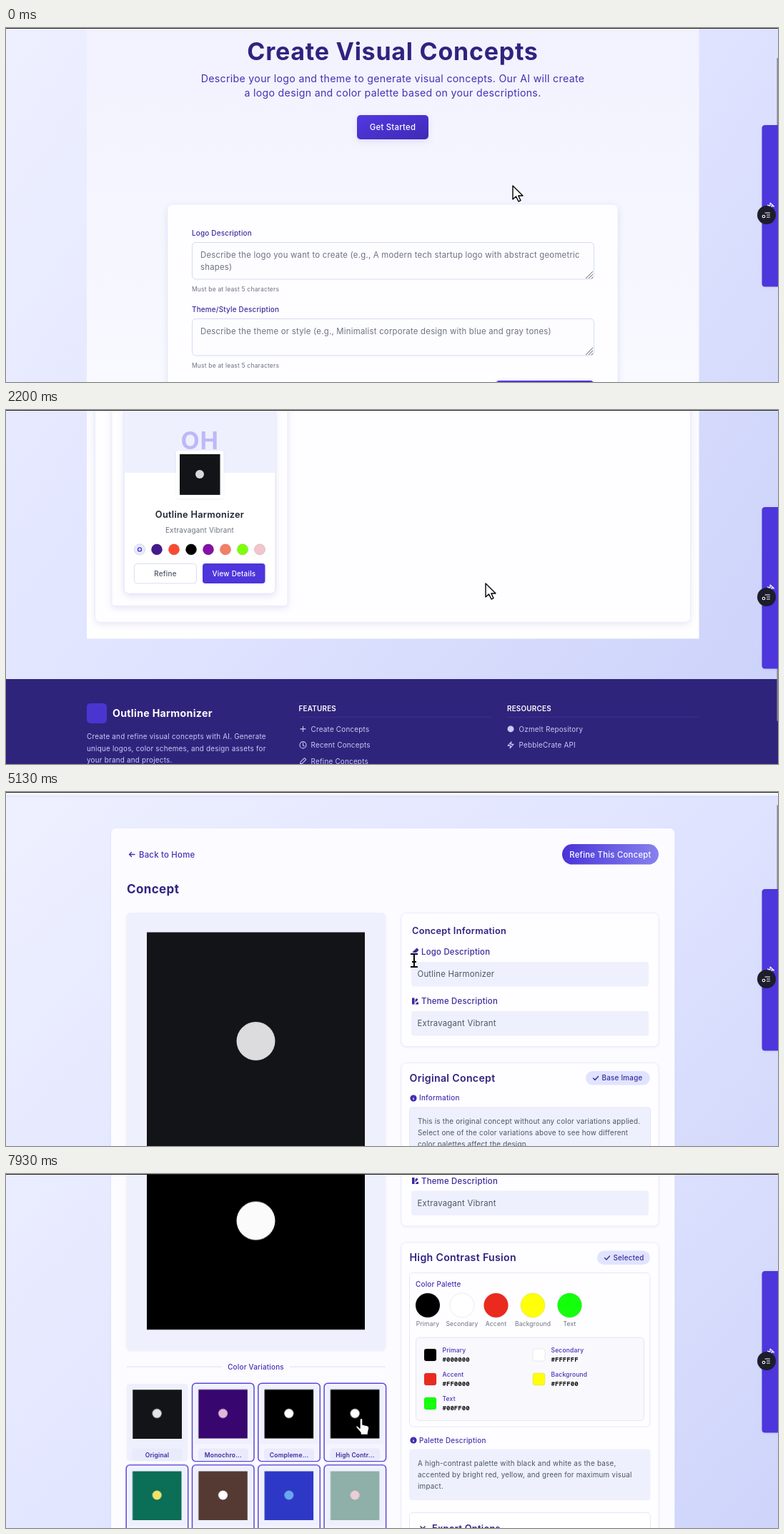
An HTML page that plays this animation: 1080x496 px, repeating every 8 s.

```html
<!DOCTYPE html>
<html lang="en">
<head>
<meta charset="utf-8">
<title>Concept generator walkthrough</title>
<style>
html, body { margin: 0; width: 100%; height: 100%; overflow: hidden; background: #e6e9ff; }
svg { display: block; width: 100%; height: 100%; }
text {
  font-family: Inter, "Open Sans", sans-serif; font-optical-sizing: none;
  letter-spacing: .022em; white-space: pre;
}
.xs { font-size: 8.5px; } .s { font-size: 9.9px; } .m { font-size: 11.33px; }
.l { font-size: 12.75px; } .x { font-size: 14.16px; } .h { font-size: 17px; } .d { font-size: 34px; }
.w5 { font-weight: 500; } .w6 { font-weight: 600; } .w7 { font-weight: 700; letter-spacing: .022em; }
.c { text-anchor: middle; }
.ink { fill: #2f2380; } .ind { fill: #4431b4; } .nav { fill: #3b2a9a; }
.gray { fill: #6b7280; } .slate { fill: #4b5563; } .white { fill: #fff; } .pale { fill: #c6cbf8; }
.code { font: 700 9.1px "Noto Sans Mono", "DejaVu Sans Mono", monospace; letter-spacing: 0; fill: #111; }
.card { fill: #fefdff; stroke: #ebedfd; }
.tint { fill: #eef0fd; }
.line { fill: var(--fill, none); stroke: currentColor; stroke-width: 1.1; stroke-linecap: round; stroke-linejoin: round; }
.sh { filter: drop-shadow(0 3px 4px #3b2fa01c); }
.soft { filter: drop-shadow(0 1px 1.5px #3b2fa014); }

/* scroll: --k is the share of the page offset that an element follows */
.page { --k: -1; }
.down { animation: down 8s linear infinite; }
.read { animation: read 8s linear infinite; }
@keyframes down {
  0%, 1% { transform: translateY(0); animation-timing-function: ease-in; }
  6% { transform: translateY(calc(var(--k) * 60px)); }
  16.625% { transform: translateY(calc(var(--k) * 368px)); }
  27.5% { transform: translateY(calc(var(--k) * 699px)); animation-timing-function: ease-out; }
  31%, 100% { transform: translateY(calc(var(--k) * 715px)); }
}
@keyframes read {
  0%, 60% { transform: translateY(0); animation-timing-function: ease-in; }
  65% { transform: translateY(calc(var(--k) * 56px)); }
  72% { transform: translateY(calc(var(--k) * 210px)); animation-timing-function: ease-out; }
  75.5%, 77.5% { transform: translateY(calc(var(--k) * 243.5px)); animation-timing-function: ease-in-out; }
  83.5%, 100% { transform: translateY(calc(var(--k) * 324.5px)); }
}

/* hard switches */
.sw { animation: 8s step-end infinite; }
#home { animation-name: leave; }
#detail { animation-name: enter; }
#bar2 { animation-name: barIn; }
.before { animation-name: pickOff; }
.after { animation-name: pickOn; }
#arrow { animation-name: arrow; }
#hand { animation-name: hand; }
#beam { animation-name: beam; }
@keyframes leave { 0% { opacity: 1; } 48.4%, 100% { opacity: 0; } }
@keyframes enter { 0% { opacity: 0; } 48.4%, 100% { opacity: 1; } }
@keyframes barIn { 0% { opacity: 0; } 60.5%, 100% { opacity: 1; } }
@keyframes pickOff { 0% { opacity: 1; } 93.4%, 100% { opacity: 0; } }
@keyframes pickOn { 0% { opacity: 0; } 93.4%, 100% { opacity: 1; } }
@keyframes arrow { 0% { opacity: 1; } 40.2% { opacity: 0; } 48.4% { opacity: 1; } 52.5% { opacity: 0; } 66% { opacity: 1; } 74%, 100% { opacity: 0; } }
@keyframes hand { 0% { opacity: 0; } 40.2% { opacity: 1; } 48.4% { opacity: 0; } 74%, 100% { opacity: 1; } }
@keyframes beam { 0% { opacity: 0; } 52.5% { opacity: 1; } 66%, 100% { opacity: 0; } }

/* soft changes */
.lift { animation: lift 8s ease-out infinite; }
#view { animation: press 8s linear infinite; }
#spin { animation: gone 8s linear infinite; }
#ring { transform-origin: 349px 391px; animation: turn 1s linear infinite; }
#shot { animation: appear 8s linear infinite; }
#swap { animation: swap 8s linear infinite; }
.thumb { animation: load 8s linear var(--d) infinite both; }
#pointer { animation: move 8s ease-in-out infinite; }
@keyframes lift { 0%, 38.5% { transform: translateY(0); } 42%, 100% { transform: translateY(-2.5px); } }
@keyframes press { 0%, 40.2% { fill: #4d36dc; } 42%, 100% { fill: #4429b8; } }
@keyframes gone { 0%, 58% { opacity: 1; } 59%, 100% { opacity: 0; } }
@keyframes turn { to { transform: rotate(360deg); } }
@keyframes appear { 0%, 58% { opacity: 0; } 60.5%, 100% { opacity: 1; } }
@keyframes swap { 0%, 93.4% { opacity: 0; } 96.5%, 100% { opacity: 1; } }
@keyframes load { 0%, 68.75% { opacity: 0; } 75%, 100% { opacity: 1; } }
@keyframes move {
  0%, 21.5% { transform: translate(709px, 221px); }
  27.5%, 31% { transform: translate(671px, 243px); }
  41.5%, 48.4% { transform: translate(323px, 216px); }
  53.5%, 64% { transform: translate(571px, 236px); }
  75%, 84% { transform: translate(291px, 376px); }
  92%, 100% { transform: translate(497px, 342px); }
}
</style>
</head>
<body>
<svg viewBox="0 0 1080 496" preserveAspectRatio="none">
<defs>
  <linearGradient id="bg" x2="1" y2="1"><stop stop-color="#eff1ff"/><stop offset=".5" stop-color="#dfe3ff"/><stop offset="1" stop-color="#c8cff8"/></linearGradient>
  <linearGradient id="main" x2="0" y2="1"><stop stop-color="#f1f1ff"/><stop offset=".5" stop-color="#f8f8ff"/><stop offset="1" stop-color="#fff"/></linearGradient>
  <linearGradient id="btn" x2="1" y2="1"><stop stop-color="#5039e2"/><stop offset="1" stop-color="#4129b6"/></linearGradient>
  <linearGradient id="pill" x2="1"><stop stop-color="#4a33d8"/><stop offset="1" stop-color="#8682ee"/></linearGradient>
  <linearGradient id="head" x2="0" y2="1"><stop stop-color="#fefeff"/><stop offset="1" stop-color="#f4f5ff"/></linearGradient>
  <g id="grip" stroke="#555" stroke-width=".9"><path d="M0 10 10 0M4 10 10 4M8 10 10 8"/></g>
  <path id="pen" class="line" d="M-4 4l.6-2.8L2-4.2q1 0 2.2 2.2L-1.200 3.400Z"/>
  <path id="bolt" class="line" d="M1-4.500-4 1H0L-1 4.500 4-1H0Z"/>
  <path id="check" class="line" d="M-3.500 0-1 2.500 3.500-2.500" style="stroke-width:1.4"/>
  <path id="chev" class="line" d="M-3-1.500 0 1.500 3-1.500" style="stroke-width:1.5"/>
  <g id="info"><circle r="4.600" fill="#3f2cb0"/><path d="M0-.5V2.300M0-2.300V-2" stroke="#fff" stroke-width="1.300"/></g>
  <g id="swab" fill="#3b2a9a"><path d="M-4.500-4.500h3.500v9h-3.500ZM0-2l2-2 2 2-4 4ZM0 4.500 2.500 1.500H4.500v3Z"/></g>
</defs>

<g id="home" class="sw">
  <g class="page down">
    <rect y="-127" width="1080" height="1505" fill="url(#bg)"/>
    <rect x="113" y="-90" width="856.500" height="1109.500" fill="url(#main)"/>

    <text class="d w7 c ink" x="541" y="45">Create Visual Concepts</text>
    <text class="x c ind" x="541" y="75.500">Describe your logo and theme to generate visual concepts. Our AI will create</text>
    <text class="x c ind" x="541" y="95.500">a logo design and color palette based on your descriptions.</text>
    <rect class="sh" x="491" y="122" width="100" height="34" rx="5" fill="url(#btn)"/>
    <text class="m w5 c white" x="541" y="143">Get Started</text>

    <rect class="card sh" x="226" y="247" width="630" height="315" rx="7"/>
    <g id="form"></g>
    <rect class="sh" x="685" y="494" width="137.500" height="34" rx="5" fill="url(#btn)"/>
    <text class="m w5 c white" x="753.500" y="515">Generate Concept</text>

    <rect class="card sh" x="124.500" y="610.500" width="833" height="386" rx="7"/>
    <text class="h w7 ink" x="147" y="651">Recent Concepts</text>
    <rect x="304" y="636" width="42" height="18" rx="9" fill="#e0e4ff"/>
    <text class="xs w7 c nav" x="325" y="648.500">Gallery</text>
    <text class="s w5 ind" x="881" y="649">View All</text>
    <use href="#chev" color="#4431b4" transform="translate(929.500 645) rotate(-90) scale(.85)"/>

    <g class="lift">
      <rect class="card sh" x="148" y="678.500" width="246" height="295" rx="4"/>
      <g class="lift">
        <rect class="sh" x="165" y="696.500" width="212" height="260" rx="7" fill="#fff" stroke="#dfe2fb"/>
        <path d="M165.500 787V704q0-7 7-7h197q7 0 7 7v83Z" class="tint"/>
        <text class="d w7 c" x="271" y="754" fill="#bdb9f8">OH</text>
        <rect class="soft" x="238" y="756" width="66.500" height="67" rx="4" fill="#fff"/>
        <rect x="243" y="761" width="56.500" height="57" fill="#131417"/>
        <circle cx="271" cy="789" r="6" fill="#d9d9dc"/>
        <text class="l w6 c" x="271" y="850.500" fill="#1f2333">Outline Harmonizer</text>
        <text class="s c gray" x="271" y="871">Extravagant Vibrant</text>
        <g id="dots"></g>
        <rect x="179.500" y="914.500" width="87" height="27.500" rx="4" fill="#fff" stroke="#dcdcf5"/>
        <text class="s w5 c slate" x="223" y="932">Refine</text>
        <rect id="view" x="275" y="914" width="87.500" height="28" rx="4" fill="#4d36dc"/>
        <text class="s w5 c white" x="319" y="932">View Details</text>
      </g>
    </g>

    <rect y="1076" width="1080" height="320" fill="#2f247b"/>
    <rect class="soft" x="113" y="1110" width="28" height="28" rx="5" fill="#4a35d0"/>
    <text class="x w7 white" x="149" y="1129">Outline Harmonizer</text>
    <g class="s pale">
      <text x="113" y="1160.500">Create and refine visual concepts with AI. Generate</text>
      <text x="113" y="1177">unique logos, color schemes, and design assets for</text>
      <text x="113" y="1193">your brand and projects.</text>
      <text x="426.500" y="1150">Create Concepts</text>
      <text x="426.500" y="1172.500">Recent Concepts</text>
      <text x="426.500" y="1195">Refine Concepts</text>
      <text x="717.500" y="1150">Ozmelt Repository</text>
      <text x="717.500" y="1172.500">PebbleCrate API</text>
    </g>
    <text class="s w6 white" x="409.500" y="1121">FEATURES</text>
    <text class="s w6 white" x="701" y="1121">RESOURCES</text>
    <path d="M410 1129.500H679M701 1129.500H969" stroke="#3b2f9a"/>
    <g color="#c6cbf8">
      <path class="line" d="M415.500 1142.500v7M412 1146h7"/>
      <circle class="line" cx="415.500" cy="1168.500" r="4.500"/>
      <path class="line" d="M415.500 1166v3l2 1"/>
      <use href="#pen" x="415.500" y="1191"/>
      <circle cx="706" cy="1146" r="4.500" fill="#c6cbf8"/>
      <use href="#bolt" x="706" y="1168.500"/>
    </g>
  </g>
  <rect class="down" style="--k:.33" x="1078.500" y="42" width="1.500" height="163" fill="#85858f"/>
</g>

<g id="detail" class="sw">
  <g class="page read">
    <rect width="1080" height="1110" fill="url(#bg)"/>
    <rect class="soft" width="1080" height="46" fill="url(#head)"/>
    <path d="M0 46.500H1080" stroke="#dfe2fa"/>
    <circle class="soft" cx="127" cy="24" r="14" fill="#4a32c8"/>
    <text class="x w7" x="149" y="28.500" fill="url(#pill)">Outline Harmonizer</text>
    <g class="s w5 nav">
      <text x="749" y="27.500">Create</text>
      <text x="836" y="27.500">Recent</text>
      <text x="925" y="27.500">Refine</text>
    </g>
    <path d="M738 19l1.200 3.800L743 24l-3.800 1.200L738 29l-1.200-3.800L733 24l3.800-1.200ZM733.500 19l.6 1.600 1.600.6-1.600.6-.6 1.600-.6-1.600-1.600-.6 1.600-.6ZM733.500 26l.6 1.300 1.300.6-1.300.6-.6 1.300-.6-1.300-1.300-.6 1.300-.6Z" fill="#f0a044"/>
    <path d="M818 20l5-1 2 8-5 1.500Z" fill="#3fa04a"/>
    <path d="M822 21l4-1 3 7-5 2Z" fill="#d8413c"/>
    <path d="M825 22l3 0 1.500 6-3.500 1Z" fill="#4068c8"/>
    <rect x="907.500" y="19" width="10" height="10" rx="1.500" fill="#429be0"/>
    <path d="M910 24a2.500 2.500 0 0 1 4.500-1.500M915 24a2.500 2.500 0 0 1-4.500 1.500" fill="none" stroke="#fff"/>

    <rect class="soft" x="147" y="92" width="788.500" height="950" rx="7" fill="#fcfbff"/>
    <path class="line" color="#4330b5" d="M180 128.500h-7.500m3-3-3 3 3 3" style="stroke-width:1.4"/>
    <text class="m w5 ind" x="186" y="132.500">Back to Home</text>
    <rect x="778" y="114" width="135" height="28.500" rx="14.200" fill="url(#pill)"/>
    <text class="m w5 c white" x="845.500" y="132.500">Refine This Concept</text>
    <text class="h w7 ink" x="169" y="183">Concept</text>

    <rect class="tint soft" x="168.500" y="210" width="362.500" height="361.500" rx="6"/>
    <g id="spin"><g id="ring" fill="none">
      <circle cx="349" cy="391" r="11" stroke="#d3d3f8"/>
      <circle cx="349" cy="391" r="11" stroke="#4d36dc" stroke-width="1.300" pathLength="100" stroke-dasharray="42 8"/>
    </g></g>
    <g id="shot">
      <rect x="197" y="237.500" width="305" height="305" fill="#131417"/>
      <circle cx="349.500" cy="390" r="27" fill="#dcdcde"/>
      <g id="swap">
        <rect x="197" y="237.500" width="305" height="305" fill="#000"/>
        <circle cx="349.500" cy="390" r="27" fill="#fbfbfb"/>
      </g>
    </g>
    <path d="M169 594.500H301M397 594.500H531" stroke="#dcdcfa"/>
    <text class="s w5 c ind" x="349.500" y="598">Color Variations</text>
    <g id="thumbs"></g>

    <rect class="card soft" x="553" y="210.500" width="360" height="187" rx="7"/>
    <text class="l w6 ink" x="568" y="240">Concept Information</text>
    <use href="#pen" x="572.500" y="264.500" color="#3b2a9a" style="--fill:#3b2a9a"/>
    <text class="m w5 nav" x="581" y="268.500">Logo Description</text>
    <rect class="tint" x="567" y="279" width="332" height="34.500" rx="4"/>
    <text class="m slate" x="575.500" y="300">Outline Harmonizer</text>
    <use href="#swab" x="572.500" y="334"/>
    <text class="m w5 nav" x="581" y="338">Theme Description</text>
    <rect class="tint" x="567" y="348" width="332" height="34.500" rx="4"/>
    <text class="m slate" x="575.500" y="369">Extravagant Vibrant</text>

    <g class="sw before">
      <rect class="card soft" x="553" y="420.500" width="360" height="205.500" rx="7"/>
      <text class="x w6 ink" x="564.500" y="447">Original Concept</text>
      <rect x="811" y="432" width="90" height="19.500" rx="9.700" fill="#e0e4ff"/>
      <use href="#check" x="825" y="442" color="#3b2a9a"/>
      <text class="s w5 nav" x="833.500" y="445">Base Image</text>
      <use href="#info" x="570" y="470"/>
      <text class="s w5 ind" x="578" y="473">Information</text>
      <rect class="tint" x="564.500" y="483" width="337" height="71" rx="4" stroke="#e2e5f8"/>
      <g class="s slate">
        <text x="576" y="506">This is the original concept without any color variations applied.</text>
        <text x="576" y="522">Select one of the color variations above to see how different</text>
        <text x="576" y="538">color palettes affect the design.</text>
      </g>
      <rect x="564.500" y="571.500" width="337" height="43" rx="5" fill="#fff" stroke="#e4e7fb"/>
      <use href="#chev" x="583" y="592.500" color="#2f2380"/>
      <text class="l w6 ink" x="596" y="597.500">Export Options</text>
    </g>

    <g class="sw after">
      <rect class="card soft" x="553" y="420.500" width="360" height="434" rx="7"/>
      <text class="x w6 ink" x="564.500" y="446.500">High Contrast Fusion</text>
      <rect x="827" y="432" width="74" height="19.500" rx="9.700" fill="#e0e4ff"/>
      <use href="#check" x="841" y="442" color="#3b2a9a"/>
      <text class="s w5 nav" x="849.500" y="445">Selected</text>
      <rect x="564.500" y="463" width="336.500" height="215.500" rx="5" fill="#fefdff" stroke="#e6e8fa"/>
      <text class="s w5 ind" x="573" y="482">Color Palette</text>
      <rect x="573.500" y="553.500" width="319" height="116.500" rx="5" fill="#f9f8fd" stroke="#e6e6f0"/>
      <g id="palette"></g>
      <use href="#info" x="570" y="697.500"/>
      <text class="s w5 ind" x="578" y="701">Palette Description</text>
      <rect class="tint" x="564" y="710" width="337.500" height="71.500" rx="4"/>
      <g class="s slate">
        <text x="576" y="733.500">A high-contrast palette with black and white as the base,</text>
        <text x="576" y="749.500">accented by bright red, yellow, and green for maximum visual</text>
        <text x="576" y="765.500">impact.</text>
      </g>
      <rect x="564.500" y="799" width="337" height="43" rx="5" fill="#fff" stroke="#e4e7fb"/>
      <use href="#chev" x="583" y="820" color="#2f2380"/>
      <text class="l w6 ink" x="596" y="825">Export Options</text>
    </g>
  </g>
  <g id="bar2" class="sw"><rect class="read" style="--k:.45" x="1078.500" width="1.500" height="215" fill="#85858f"/></g>
</g>

<path class="soft" d="M1080 136H1062q-4.500 0-4.500 4.500V358q0 4.500 4.500 4.500H1080Z" fill="#4d36dc"/>
<use href="#bolt" transform="translate(1070 249) rotate(-90)" color="#fff"/>
<circle class="soft" cx="1064" cy="262" r="13" fill="#1d1d2b"/>
<g class="line" color="#fff"><circle cx="1060" cy="264" r="1.800"/><path d="M1062 259h6.500M1064.500 262h4M1064.500 265h4"/></g>
<rect width="1080" height="1" fill="#222226"/>

<g id="pointer" fill="#fff" stroke="#000" stroke-width="1.400" stroke-linejoin="round">
  <path id="arrow" class="sw" d="M0 0V19L4.500 15 8 22 11 20.700 7.800 14H14Z"/>
  <path id="hand" class="sw" d="M-2 2.500C-2-.5 2-.5 2 2.500V9L8.500 10.500C10.500 11 11 12 11 14L9.500 20.500V23.500H-1V20.500L-7 13.500C-8.500 11-6 10-4.500 11.500L-2 14Z"/>
  <g id="beam" class="sw" fill="none">
    <path d="M-5-9H5M0-9V9M-5 9H5M-3 2H3" stroke="#fff" stroke-width="4"/>
    <path d="M-5-9H5M0-9V9M-5 9H5M-3 2H3" stroke-width="2"/>
  </g>
</g>
</svg>

<script>
const fill = (id, parts) => document.getElementById(id).innerHTML = parts.join('');
const text = (x, y, cls, str) => `<text class="${cls}" x="${x}" y="${y}">${str}</text>`;

const fields = [
  ['Logo Description', 'Describe the logo you want to create (e.g., A modern tech startup logo with abstract geometric', 'shapes)'],
  ['Theme/Style Description', 'Describe the theme or style (e.g., Minimalist corporate design with blue and gray tones)', '']
];
fill('form', fields.map(([label, first, second], i) => `<g transform="translate(0 ${i * 107})">
  ${text(260, 291, 's w5 nav', label)}
  <rect x="260.5" y="300.500" width="562" height="51.500" rx="5" fill="#fdfcff" stroke="#d4dbf2"/>
  ${text(272, 322, 'm gray', first)}${text(272, 339, 'm gray', second)}
  <use href="#grip" x="811" y="341"/>
  ${text(260, 368.5, 'xs gray', 'Must be at least 5 characters')}</g>`));

const dots = ['#e8eafd', '#451a8c', '#fa4a35', '#000', '#8310a8', '#f27f68', '#7fff0a', '#f2c5cd'];
fill('dots', dots.map((c, i) =>
  `<circle cx="${187 + 24 * i}" cy="894.500" r="7.700" fill="${c}" stroke="#0002" stroke-width=".8"/>`
).concat('<circle cx="187" cy="894.500" r="2.500" fill="none" stroke="#4d36dc" stroke-width="1.400"/>'));

// image colour, mark colour, fade delay in ms, label
const thumbs = [
  ['#131417', '#e4e4e6', 0, 'Original'], ['#37066e', '#e3b6dc', 80, 'Monochro...'],
  ['#000', '#fff', 370, 'Compleme...'], ['#000', '#fff', 230, 'High Contr...'],
  ['#0b6e57', '#f2e26a', 400, ''], ['#553a34', '#fff', 440, ''],
  ['#2e38c6', '#6aa8ee', 480, ''], ['#8eb0a8', '#eccdd6', 520, '']
];
fill('thumbs', thumbs.map(([c, mark, d, label], i) => {
  const x = 167.5 + 92.3 * (i % 4), y = 617 + 114.5 * (i >> 2);
  return `<g transform="translate(${x} ${y})">
    <rect x="1" y="1" width="86" height="109" rx="5" class="tint"/>
    <rect x=".7" y=".7" width="86.500" height="109.500" rx="5" fill="#f4f5ff" stroke="#5a47dc" stroke-width="1.500" class="${i ? '' : 'sw before'}"/>
    <path class="tint" d="M4 4H84V86H4Z"/>
    <g class="thumb" style="--d:${d}ms"><rect x="9.500" y="9.500" width="68.500" height="68.500" fill="${c}"/>
    <circle cx="43.700" cy="43" r="6.500" fill="${mark}"/></g>
    ${label && `<rect x="9" y="92" width="70" height="17" rx="4" fill="#e9ebfd"/>` + text(44, 104, 'xs w6 c nav', label)}</g>`;
}));

const tones = [
  ['Primary', '#000000', '#000', 590], ['Secondary', '#FFFFFF', '#fff', 638], ['Accent', '#FF0000', '#ea2a1f', 685.5],
  ['Background', '#FFFF00', '#ffff0a', 737], ['Text', '#00FF00', '#14ff0c', 788.5]
];
fill('palette', tones.map(([name, hex, c, cx], i) => {
  const x = 585 + 152 * (i % 2), y = 569.500 + 34 * (i >> 1);
  return `<circle cx="${cx}" cy="508.500" r="17" fill="${c}" stroke="#2222441c" stroke-width=".8"/>
    ${text(cx, 537, 'xs c gray', name)}
    <rect x="${x}" y="${y}" width="17" height="17" rx="3" fill="${c}" stroke="#2222441c" stroke-width=".8"/>
    ${text(x + 25.5, y + 4.5, 'xs w5 ind', name)}${text(x + 25.5, y + 17.5, 'code', hex)}`;
}));
</script>
</body>
</html>
```
